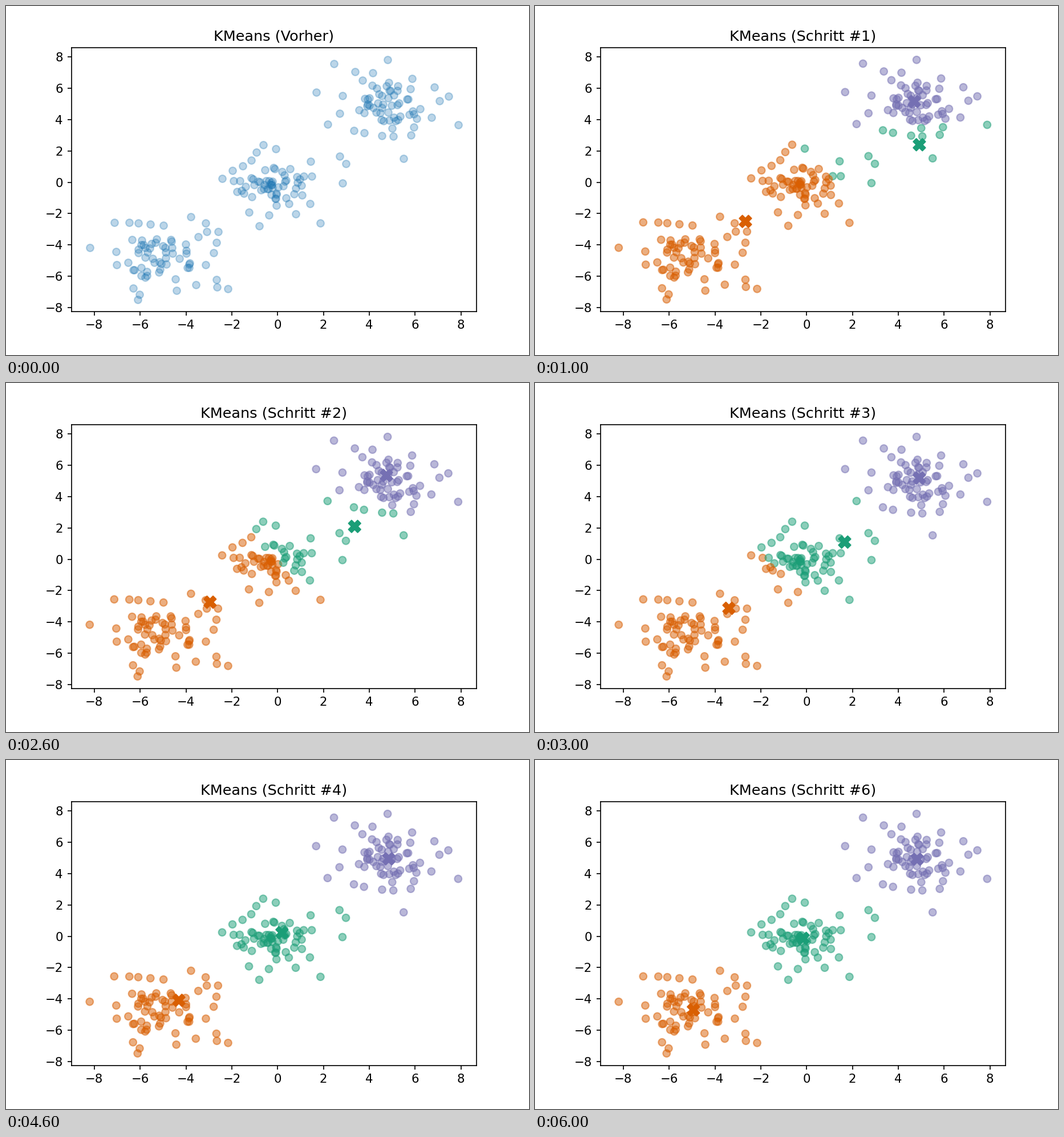
These frames come from a looping animation (917x611 px, 7 s). A matplotlib script:

```python
import numpy as np
import matplotlib.pyplot as plt
from matplotlib.animation import FuncAnimation
from matplotlib.colors import to_rgba_array

plt.rcParams["font.family"] = "DejaVu Sans"

PALETTE = ["#1b9e77", "#d95f02", "#7570b3"]

# Outlying points of each cluster; the dense cores are sampled.
UPPER = [
    (2.46, 7.58), (4.80, 7.82), (3.37, 7.08), (4.14, 7.00), (3.70, 6.52),
    (4.12, 6.19), (4.84, 6.36), (5.87, 6.63), (6.84, 6.07), (7.45, 5.49),
    (7.06, 5.21), (7.88, 3.67), (6.71, 4.14), (1.68, 5.76), (2.83, 5.54),
    (2.70, 4.41), (2.18, 3.72), (3.55, 4.61), (3.33, 3.32), (3.77, 3.16),
    (4.56, 2.98), (5.05, 2.93), (5.81, 3.03), (5.95, 3.52), (5.50, 1.53),
]
MIDDLE = [
    (-0.63, 2.40), (-0.93, 1.93), (-0.08, 2.15), (-1.15, 1.41), (2.70, 1.67),
    (2.98, 1.18), (2.83, -0.05), (1.44, 1.34), (1.49, 0.39), (1.14, 0.39),
    (1.06, -0.81), (1.41, -1.35), (1.87, -2.59), (0.79, -2.01), (0.49, -1.36),
    (-0.80, -2.78), (-0.38, -2.09), (-1.25, -1.92), (-0.05, -1.47),
    (-2.42, 0.25), (-1.97, 0.76), (-1.92, 0.09), (-1.77, -0.61),
    (-1.53, 1.05), (0.53, 0.85),
]
LOWER = [
    (-8.20, -4.18), (-7.13, -2.56), (-6.47, -2.57), (-6.08, -2.61),
    (-5.55, -2.68), (-4.98, -2.76), (-3.78, -2.20), (-3.14, -2.62),
    (-3.09, -3.15), (-2.60, -3.15), (-2.67, -3.86), (-3.46, -3.49),
    (-2.79, -4.50), (-3.13, -5.26), (-2.67, -6.22), (-2.65, -6.68),
    (-2.16, -6.81), (-3.57, -6.54), (-4.42, -6.92), (-6.11, -7.48),
    (-6.02, -7.16), (-6.31, -6.77), (-7.04, -4.42), (-7.02, -5.26),
    (-6.35, -3.67),
]

# Centroids per step: green, orange, purple.
CENTROIDS = np.array([
    [(4.92, 2.40), (-2.67, -2.50), (4.70, 5.16)],
    [(3.36, 2.10), (-2.95, -2.74), (4.75, 5.35)],
    [(1.66, 1.10), (-3.39, -3.13), (4.92, 5.19)],
    [(0.19, 0.23), (-4.31, -4.09), (4.85, 4.95)],
    [(-0.15, -0.13), (-4.94, -4.70), (4.82, 4.92)],
])
STEPS = 6

rng = np.random.RandomState(7)


def core(center, radii, count):
    """Random points in an ellipse, denser towards its middle."""
    angle = rng.uniform(0, 2 * np.pi, count)
    radius = rng.uniform(0, 1, count) ** 0.6
    ring = np.column_stack([np.cos(angle), np.sin(angle)])
    return np.array(center) + ring * radius[:, None] * np.array(radii)


points = np.vstack([
    UPPER, core((5.0, 4.9), (1.3, 1.6), 43),
    MIDDLE, core((-0.35, -0.05), (1.5, 1.1), 44),
    LOWER, core((-5.1, -4.8), (1.55, 1.55), 44),
])


def nearest(centers):
    gaps = points[:, None, :] - centers[None, :, :]
    return np.argmin((gaps ** 2).sum(axis=2), axis=1)


fig, ax = plt.subplots(figsize=(6.0033, 4), dpi=152.75)
fig.subplots_adjust(left=0.125, right=0.9, bottom=0.125, top=0.88)
ax.set_xlim(-9.0, 8.688)
ax.set_ylim(-8.245, 8.585)
ax.set_xticks(range(-8, 9, 2))
ax.set_yticks(range(-8, 9, 2))
title = ax.set_title("")
dots = ax.scatter(points[:, 0], points[:, 1])
crosses = ax.scatter(*CENTROIDS[0].T, s=100, c=PALETTE, marker="X")


def draw(step):
    crosses.set_visible(step > 0)
    if step == 0:
        title.set_text("KMeans (Vorher)")
        dots.set_color(to_rgba_array("#1f77b4", 0.3))
    else:
        centers = CENTROIDS[min(step, len(CENTROIDS)) - 1]
        title.set_text(f"KMeans (Schritt #{step})")
        dots.set_color(to_rgba_array(PALETTE, 0.5)[nearest(centers)])
        crosses.set_offsets(centers)
    return dots, crosses, title


anim = FuncAnimation(fig, draw, frames=STEPS + 1, init_func=lambda: draw(0),
                     interval=1000, repeat=True, repeat_delay=0, blit=False)
plt.show()
```
